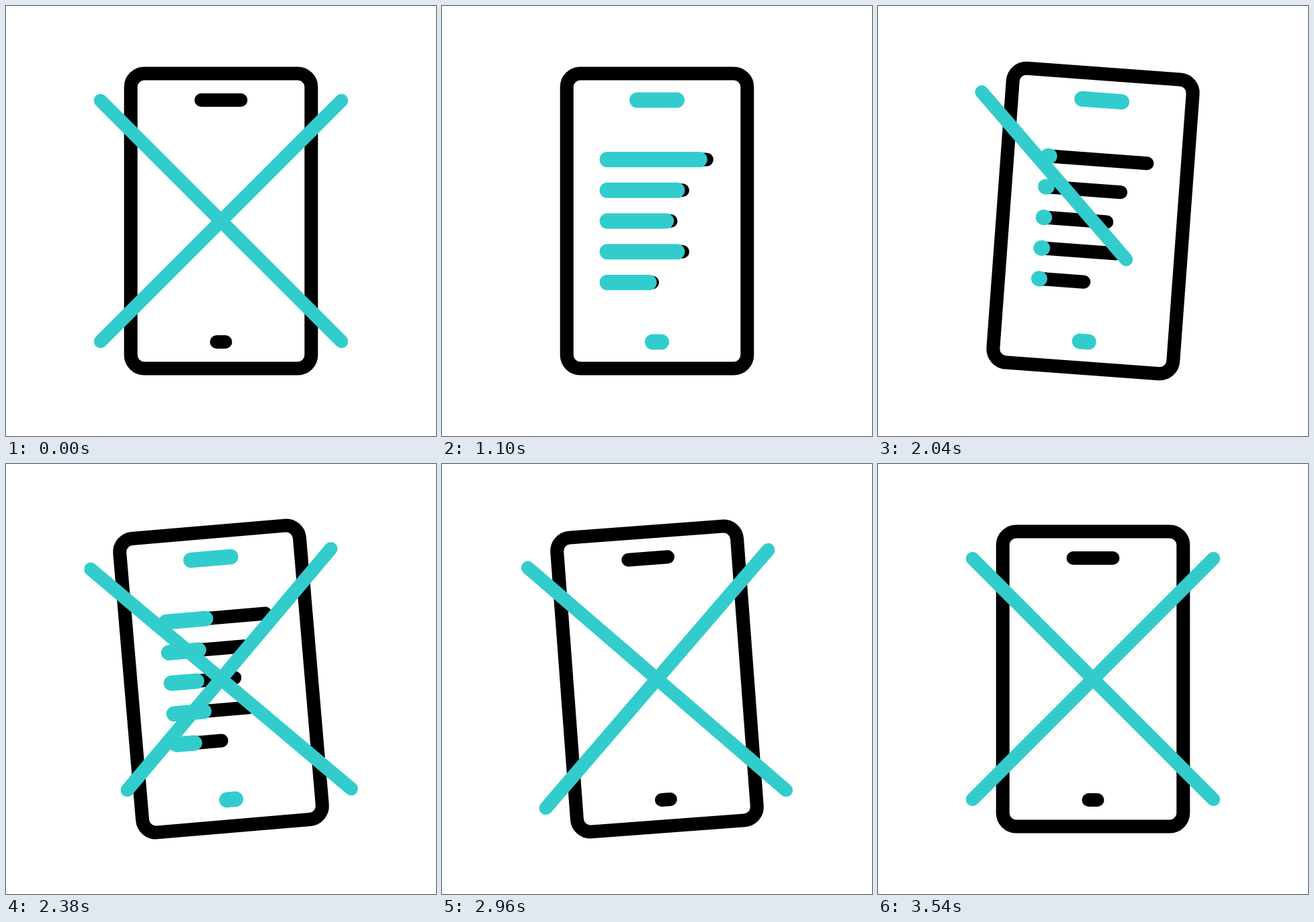
Animation of 640x640 px, one loop 3600 ms. Source, as an HTML page with a canvas:

```html
<!DOCTYPE html>
<html lang="en">
<head>
<meta charset="utf-8">
<title>Phone</title>
<style>
  html, body { margin: 0; height: 100%; overflow: hidden; background: #fff; }
  canvas { display: block; }
</style>
</head>
<body>
<canvas id="stage" width="640" height="640"></canvas>
<script>
const ctx = document.getElementById('stage').getContext('2d');
const LOOP = 3600, BLACK = '#000', TEAL = '#33cccc';
const THIN = 20, WIDE = 23;
const TEXT_ON = 590, TEXT_OFF = 2440;
const SHAKE_START = 1952, SWING = 275, SHAKE_ANGLE = 4.95 * Math.PI / 180;

// Smooth 0 to 1 between two times
function ease(t, start, end) {
  const p = Math.min(1, Math.max(0, (t - start) / (end - start)));
  return (1 - Math.cos(Math.PI * p)) / 2;
}

const textFill = t => ease(t, 0, 710) - ease(t, 920, 1965) + ease(t, 1965, 2925);
const strokeDown = t => 1 - ease(t, 280, 590) + ease(t, 1880, 2150);
const strokeUp = t => 1 - ease(t, 0, 300) + ease(t, 2150, 2430);

function tilt(t) {
  if (t < SHAKE_START) return 0;
  const swing = Math.sin(Math.PI * (t - SHAKE_START) / SWING);
  return SHAKE_ANGLE * swing * (1 - ease(t, 3460, 3540));
}

function line(x0, y0, x1, y1, color, width, part = 1) {
  if (part <= 0) return;
  ctx.strokeStyle = color;
  ctx.lineWidth = width;
  ctx.beginPath();
  ctx.moveTo(x0, y0);
  ctx.lineTo(x0 + (x1 - x0) * part, y0 + (y1 - y0) * part);
  ctx.stroke();
}

// Coordinates are relative to the centre of the stage
function drawPhone(color, width) {
  ctx.strokeStyle = BLACK;
  ctx.lineWidth = THIN;
  ctx.beginPath();
  ctx.roundRect(-134.3, -219.5, 268.6, 439, 20);
  ctx.stroke();
  line(-29.5, -180, 29.5, -180, color, width);
  line(-6.5, 180, 6.5, 180, color, width);
}

function drawText(part) {
  [148, 112, 94.5, 112, 67].forEach((length, i) => {
    const x = -74, y = (i - 2) * 45.75;
    line(x, y, x + length, y, BLACK, THIN);
    line(x, y, x + length, y, TEAL, WIDE, part);
  });
}

function drawCross(t) {
  const r = 179.3;
  line(-r, -r, r, r, TEAL, THIN, strokeDown(t));
  line(r, -r, -r, r, TEAL, THIN, strokeUp(t));
}

function draw(t) {
  const showText = t >= TEXT_ON && t < TEXT_OFF;
  ctx.clearRect(0, 0, 640, 640);
  ctx.save();
  ctx.translate(320, 320);
  ctx.rotate(tilt(t));
  ctx.lineCap = 'round';
  drawPhone(showText ? TEAL : BLACK, showText ? WIDE : THIN);
  if (showText) drawText(textFill(t));
  drawCross(t);
  ctx.restore();
}

function tick() {
  draw(performance.now() % LOOP);
  requestAnimationFrame(tick);
}
tick();
</script>
</body>
</html>
```
